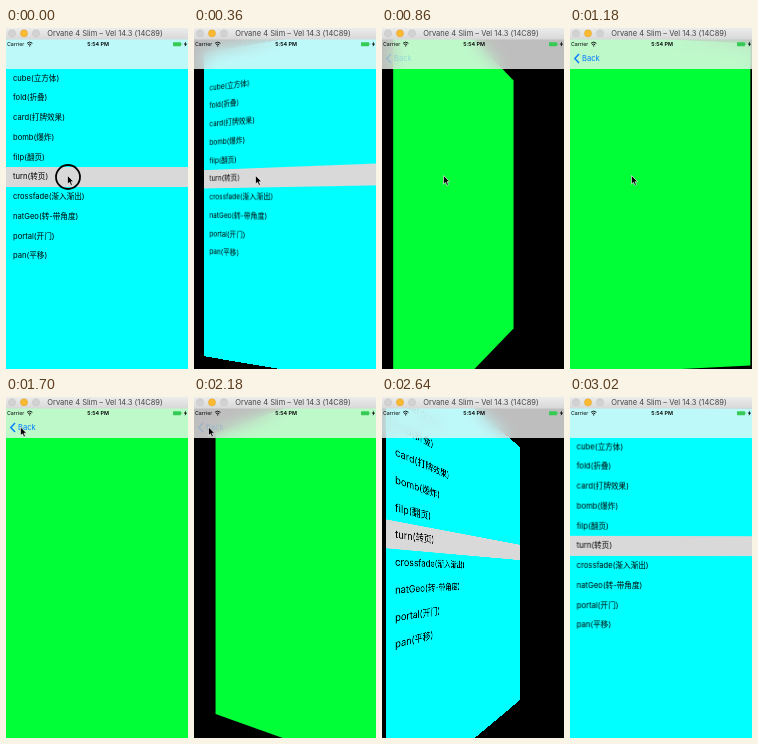
An HTML page for the animation above (3040 ms loop, 182 by 341 pixels).

```html
<!DOCTYPE html>
<html lang="zh">
<head>
<meta charset="utf-8">
<style>
html, body { margin: 0; width: 100%; height: 100%; overflow: hidden; background: #000; }
body { position: relative; font: 7.6px/1 Inter, "Noto Sans CJK SC", "Noto Sans CJK", sans-serif; }
#screen { position: absolute; left: 0; top: 11px; width: 183px; height: 331px; overflow: hidden; perspective: 222px; background: #000; }
.page { position: absolute; inset: 0; }
#list { background: #0ff; padding-top: 29.5px; box-sizing: border-box; }
#list div { height: 19.75px; line-height: 19.75px; padding-left: 7px; white-space: nowrap; }
#list .on { background: #d9d9d9; }
#detail { background: #00ff36; }
#nav { position: absolute; left: 0; top: 11px; width: 100%; height: 30px; background: rgba(248, 248, 248, .77); backdrop-filter: blur(8px); }
svg { position: absolute; left: 0; top: 0; }
</style>
</head>
<body>
<div id="screen">
  <div class="page" id="list"></div>
  <div class="page" id="detail"></div>
</div>
<div id="nav"></div>
<svg width="182" height="341" viewBox="0 0 182 341">
  <defs>
    <linearGradient id="bar" x2="0" y2="1">
      <stop stop-color="#ececec"/><stop offset="1" stop-color="#d8d8d8"/>
    </linearGradient>
  </defs>
  <rect width="182" height="11.5" fill="url(#bar)"/>
  <g stroke-width=".4">
    <circle cx="6" cy="5.3" r="3.6" fill="#d2d2d2" stroke="#bdbdbd"/>
    <circle cx="18" cy="5.3" r="3.6" fill="#f9b932" stroke="#dc9d2b"/>
    <circle cx="30" cy="5.3" r="3.6" fill="#d2d2d2" stroke="#bdbdbd"/>
  </g>
  <text x="99" y="8.2" font-size="7.5" text-anchor="middle" fill="#444">Orvane 4 Slim – Vel 14.3 (14C89)</text>

  <text x="1" y="18.3" font-size="5.3">Carrier</text>
  <g fill="none" stroke="#000" stroke-width=".9">
    <path d="M21 15.3q2.7-2.4 5.4 0M22.2 16.7q1.5-1.3 3 0"/>
  </g>
  <circle cx="23.7" cy="17.9" r=".6"/>
  <text x="92" y="18.3" font-size="5.4" font-weight="600" text-anchor="middle">5:54 PM</text>
  <rect x="167" y="14.2" width="8" height="4" rx=".6" fill="#35cb55"/>
  <rect x="175.5" y="15.4" width=".7" height="1.6" fill="#35cb55"/>
  <path d="M180 13.6l-2.2 3h1.4l-.5 2.2 2.4-3h-1.5z"/>

  <g id="back" fill="#007aff">
    <path d="M9 26l-4.2 4.5 4.2 4.5" fill="none" stroke="#007aff" stroke-width="1.4"/>
    <text x="12" y="33.2">Back</text>
  </g>
  <g id="mouse">
    <circle id="ring" cx=".5" cy="1.5" r="12" fill="none" stroke="#000" stroke-width="1.8"/>
    <path d="M0 0v8.6l2-1.8 1.4 3.1 1.5-.7-1.4-3h2.7z" fill="#000" stroke="#fff" stroke-width=".6"/>
  </g>
</svg>
<script>
const LOOP = 3040;
const $ = id => document.getElementById(id);
const names = ["cube(立方体)", "fold(折叠)", "card(打牌效果)", "bomb(爆炸)", "filp(翻页)",
  "turn(转页)", "crossfade(渐入渐出)", "natGeo(转-带角度)", "portal(开门)", "pan(平移)"];
$("list").innerHTML = names.map((s, i) => `<div${i === 5 ? ' class="on"' : ""}>${s}</div>`).join("");

const ramp = (t, from, to) => Math.min(1, Math.max(0, (t - from) / (to - from)));
const smooth = p => p * p * (3 - 2 * p);

// cubic-bezier(.42, 0, .58, 1), solved by bisection
function ease(x) {
  let lo = 0, hi = 1;
  for (let i = 0; i < 24; i++) {
    const p = (lo + hi) / 2, q = 1 - p;
    if (1.26 * q * q * p + 1.74 * q * p * p + p * p * p < x) lo = p; else hi = p;
  }
  return smooth(lo);
}

// Half a turn: the old page leaves edge-on, the new one takes its place
function turn(from, to, p) {
  const angle = 180 * p, first = angle < 90;
  from.style.visibility = first ? "visible" : "hidden";
  to.style.visibility = first ? "hidden" : "visible";
  (first ? from : to).style.transform = `rotateY(${first ? -angle : 180 - angle}deg)`;
}

function draw(now) {
  const t = now % LOOP;
  if (t < 1600) turn($("list"), $("detail"), ease(ramp(t, 145, 1301)));
  else turn($("detail"), $("list"), ease(ramp(t, 1862, 3077)));

  $("back").style.opacity = ramp(t, 780, 1180) - ramp(t, 1862, 2250);

  const move = smooth(ramp(t, 1200, 1620)), leave = smooth(ramp(t, 2250, 2480));
  const x = 61.5 - 47 * move - 26 * leave, y = 147.5 - 117.5 * move;
  $("mouse").setAttribute("transform", `translate(${x} ${y})`);
  $("ring").style.visibility = t < 120 || (t >= 1780 && t < 1900) ? "visible" : "hidden";
  requestAnimationFrame(() => draw(performance.now() - start));
}
const start = performance.now();
draw(0);
</script>
</body>
</html>
```
